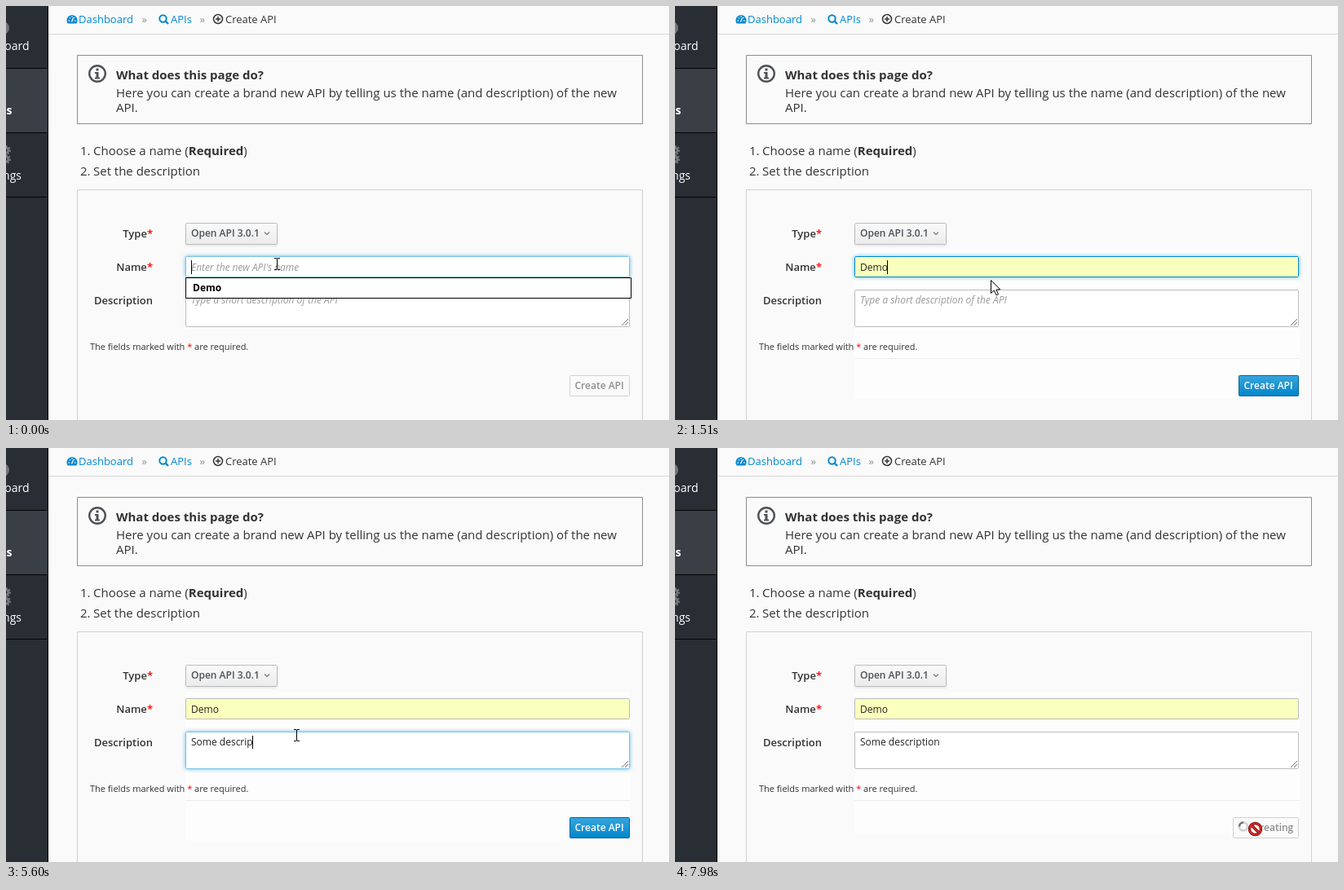
An HTML page for the animation above (8 s loop, 813x508 px).

```html
<!DOCTYPE html>
<html lang="en">
<head>
<meta charset="utf-8">
<title>Create API</title>
<style>
html, body { margin: 0; width: 813px; height: 508px; overflow: hidden; background: #fafafa }
svg { display: block }
text { font: 13px "Open Sans", sans-serif; fill: #333; white-space: pre }
.big { font-size: 15px }
.big tspan, .bold { font-weight: 700 }
.label { font-weight: 600; text-anchor: end }
.field { font-size: 12px; fill: #222 }
.hint { font-size: 12px; font-style: italic; fill: #999 }
.btn { font-size: 12px; font-weight: 600; fill: #4d5258 }
.off { fill: #8b8d8f }
.small { font-size: 11px }
.side { font-size: 14px; fill: #fff; text-anchor: end }
.link { fill: #0088ce }
.gray { fill: #8b8d8f }
.red { fill: #f00 }
.box { fill: #fff; stroke: #bbb }
.hover { stroke: #7dc3e8 }
.focus { stroke: #0088ce }
.glow { filter: drop-shadow(0 0 2.5px rgba(0, 136, 206, .6)) }
</style>
</head>
<body>
<svg width="813" height="508" viewBox="0 0 813 508">
  <defs>
    <linearGradient id="blue" x2="0" y2="1"><stop stop-color="#39a5dc"/><stop offset="1" stop-color="#0085cb"/></linearGradient>
    <linearGradient id="pale" x2="0" y2="1"><stop stop-color="#fafafa"/><stop offset="1" stop-color="#ebebeb"/></linearGradient>
  </defs>
  <path fill="#fafafa" d="M0 0H813V508H0z"/>

  <!-- sidebar -->
  <path fill="#292e34" d="M0 0H51V508H0z"/>
  <path fill="#393f45" d="M0 77H51V155H0z"/>
  <path stroke="#030303" d="M51.5 0V508M0 76.5H51M0 155.5H51M0 234.5H51" fill="none"/>
  <circle cx="-4" cy="27" r="8" fill="#72767b"/>
  <g fill="#292e34" stroke="#72767b" stroke-width="3"><circle cx="0" cy="177" r="3"/><circle cx="0" cy="188" r="3"/></g>
  <g stroke="#72767b" stroke-width="2" fill="none" stroke-dasharray="2 1.8"><circle cx="0" cy="177" r="5"/><circle cx="0" cy="188" r="5"/></g>
  <text class="side" x="28.5" y="54">Dashboard</text>
  <text class="side bold" x="7.5" y="133">APIs</text>
  <text class="side" x="19" y="213">Settings</text>

  <!-- breadcrumb -->
  <path d="M52 34.5H813" stroke="#d6d6d6"/>
  <path class="link" d="M75.6 21.5A6.6 6.6 0 1 1 86.4 21.5z"/>
  <path d="M80.5 19.5L82.5 14.5M76.5 18h1.5M84 18h1.5M78 14.3l1 .9M84.3 14l-.8.9M81 12v1.4" stroke="#fafafa" stroke-width="1.3"/>
  <text class="link" x="89" y="21">Dashboard</text>
  <text class="gray" x="166.500" y="21">»</text>
  <circle cx="192.500" cy="15.500" r="4.200" fill="none" stroke="#0088ce" stroke-width="2"/>
  <path d="M195.500 18.500L199 22" stroke="#0088ce" stroke-width="2.400"/>
  <text class="link" x="202" y="21">APIs</text>
  <text class="gray" x="237.500" y="21">»</text>
  <path d="M265.500 16a5.500 5.500 0 1 0-11 0a5.500 5.500 0 1 0 11 0M257 16h6M260 13v6" fill="none" stroke="#333" stroke-width="1.500"/>
  <text x="269" y="21">Create API</text>

  <!-- introduction -->
  <path d="M87.500 60.500H780.500V144.500H87.500z" fill="none" stroke="#8b8d8f"/>
  <circle cx="112" cy="83" r="9.800" fill="none" stroke="#4d5258" stroke-width="2.400"/>
  <path d="M110.500 76.500h3v3h-3zM109 81h4.500v6.500h1.500v2h-6v-2h1.500v-4.500H109z" fill="#4d5258"/>
  <text class="big bold" x="135" y="90">What does this page do?</text>
  <text class="big" x="135" y="112">Here you can create a brand new API by telling us the name (and description) of the new</text>
  <text class="big" x="135" y="130">API.</text>
  <text class="big" x="91" y="183">1.</text>
  <text class="big" x="107" y="183">Choose a name (<tspan>Required</tspan>)</text>
  <text class="big" x="91" y="208">2.</text>
  <text class="big" x="107" y="208">Set the description</text>

  <!-- form -->
  <path d="M87.500 509V225.500H780.500V509" fill="none" stroke="#d1d1d1"/>
  <g id="panel">
    <rect id="patch" x="220" y="300" width="546" height="182" fill="#fdfdfd"/>
    <path d="M220 432.500H766" stroke="#ededed"/>
  </g>
  <text class="label" x="180" y="284">Type<tspan class="red">*</tspan></text>
  <text class="label" x="180" y="325">Name<tspan class="red">*</tspan></text>
  <text class="label" x="180" y="366">Description</text>
  <rect x="220.500" y="266.500" width="112" height="26" rx="1" fill="url(#pale)" stroke="#bbb" style="filter:drop-shadow(0 2px 1px #0001)"/>
  <text class="btn" x="227" y="283">Open API 3.0.1</text>
  <path d="M317 277.500l3 3 3-3" fill="none" stroke="#72767b" stroke-width="1.200"/>

  <rect id="descBox" x="220.500" y="348.500" width="544" height="45" rx="1"/>
  <path d="M755 392l8-8M759 392l4-4" stroke="#777"/>
  <text id="descHint" class="hint" x="227" y="365">Type a short description of the API</text>
  <text id="desc" class="field" x="227" y="365"></text>
  <rect id="descCaret" y="353" width="1" height="16" fill="#000"/>

  <rect id="nameBox" x="220.500" y="307.500" width="544" height="25" rx="1"/>
  <text id="nameHint" class="hint" x="227" y="325">Enter the new API's name</text>
  <text id="name" class="field" x="227" y="325"></text>
  <rect id="nameCaret" y="312" width="1" height="17" fill="#000"/>

  <g id="popup">
    <path d="M220.500 333.500H766.500V358.500H220.500z" fill="#fff" stroke="#000"/>
    <text class="field bold" x="229" y="350" style="fill:#000">Demo</text>
  </g>
  <text class="small" x="103" y="422">The fields marked with <tspan class="red">*</tspan> are required.</text>

  <rect id="button" y="453.500" height="25" rx="1"/>
  <text id="caption" y="470"></text>
  <g id="spinner" fill="none" stroke-width="2.500">
    <circle cx="697" cy="464.500" r="5" stroke="#d1d1d1"/>
    <path d="M697 459.500A5 5 0 0 0 692 464.500" stroke="#72767b"/>
  </g>

  <!-- pointers -->
  <path id="beam" d="M-3 -6.500H-1Q.5 -6.500 .5 -5.500Q.5 -6.500 2 -6.500H4M.5 -6V7M-3 7.500H-1Q.5 7.500 .5 6.500Q.5 7.500 2 7.500H4" fill="none" stroke="#000"/>
  <path id="arrow" d="M.5 .5V16.500L4.200 13L7 18.800L9.500 17.700L6.900 12H11.800z" fill="#fff" stroke="#000"/>
  <g id="stop" fill="none">
    <circle r="7" fill="#fff" stroke="#5c1010" stroke-width="3.400"/>
    <path d="M-5 -5L5 5" stroke="#5c1010" stroke-width="3.400"/>
    <path d="M7 0A7 7 0 1 0 -7 0A7 7 0 1 0 7 0M-5 -5L5 5" stroke="#d22" stroke-width="2.200"/>
  </g>
</svg>
<script>
const $ = id => document.getElementById(id);
const LOOP = 8000, FILL = 1510, FOCUS = 1890, SUBMIT = 7840;
const phrase = "Some description";

// [time, x, y, pointer], each pose held until the next
const poses = [
  [0, 332, 316, "beam"], [670, 340, 326, "beam"], [820, 368, 345, "arrow"], [970, 392, 366, "beam"],
  [1100, 391, 352, "arrow"], [1220, 387, 336, "arrow"], [1630, 380, 340, "arrow"],
  [1750, 366, 350, "beam"], [FOCUS, 356, 352, "beam"], [6990, 303, 362, "beam"],
  [7110, 330, 371, "beam"], [7250, 420, 398, "arrow"], [7400, 540, 428, "arrow"],
  [7550, 650, 452, "arrow"], [7690, 705, 464, "arrow"], [SUBMIT, 711.5, 467.5, "stop"]
];
// [time, letters typed]
const typing = [
  [0, 0], [3120, 1], [3390, 2], [3510, 3], [3640, 5], [4040, 6], [4180, 7], [4320, 8], [4450, 9],
  [5040, 10], [5190, 11], [5600, 12], [5720, 13], [5850, 14], [5990, 15], [6130, 16]
];
const nameLook = [[0, "hover glow"], [820, "focus glow"], [FOCUS, ""]];
const descLook = [[0, ""], [970, "hover"], [1100, ""], [1750, "hover"], [FOCUS, "hover glow"], [6990, "focus glow"], [SUBMIT, ""]];
const nameBlink = [[0, 1], [120, 0], [670, 1], [1220, 0], [FILL, 1], [FOCUS, 0]];
const descBlink = [[0, 0], [FOCUS, 1], [2480, 0], [2870, 1], [6570, 0]];

const at = (list, t) => list.findLast(step => step[0] <= t);
const show = (id, on) => $(id).style.display = on ? "" : "none";
const set = (id, attrs) => { for (const k in attrs) $(id).setAttribute(k, attrs[k]); };

function drawField(id, value, look, caret) {
  $(id).textContent = value;
  set(id + "Box", { class: "box " + look });
  show(id + "Hint", !value);
  show(id + "Caret", caret);
  const width = value ? $(id).getComputedTextLength() : 0;
  set(id + "Caret", { x: 227 + Math.floor(width) });
}

function drawButton(ready, busy) {
  const x = busy ? 684.5 : 691.5;
  set("button", { x, width: 764.5 - x, fill: ready ? "url(#blue)" : "#fafafa", stroke: ready ? "#00659c" : "#d1d1d1" });
  set("caption", { x: busy ? 709.5 : 697.5, class: ready ? "btn" : "btn off" });
  $("caption").style.fill = ready ? "#fff" : "";
  $("caption").textContent = busy ? "Creating" : "Create API";
}

function draw(t) {
  const filled = t >= FILL, busy = t >= SUBMIT;
  drawField("name", filled ? "Demo" : "", at(nameLook, t)[1], at(nameBlink, t)[1]);
  drawField("desc", phrase.slice(0, at(typing, t)[1]), at(descLook, t)[1], at(descBlink, t)[1]);
  $("nameBox").style.fill = filled ? "#faffbd" : "";
  show("popup", !filled);
  show("panel", filled);
  set("patch", { height: busy ? 172 : 182 });
  drawButton(filled && !busy, busy);
  show("spinner", busy);
  set("spinner", { transform: `rotate(${busy ? (t - SUBMIT - 140) * .36 : 0} 697 464.5)` });
  const [, x, y, pointer] = at(poses, t);
  for (const id of ["beam", "arrow", "stop"]) show(id, id === pointer);
  set(pointer, { transform: `translate(${x} ${y})` });
}

const start = performance.now();
function tick() {
  draw((performance.now() - start) % LOOP);
  requestAnimationFrame(tick);
}
tick();
</script>
</body>
</html>
```
